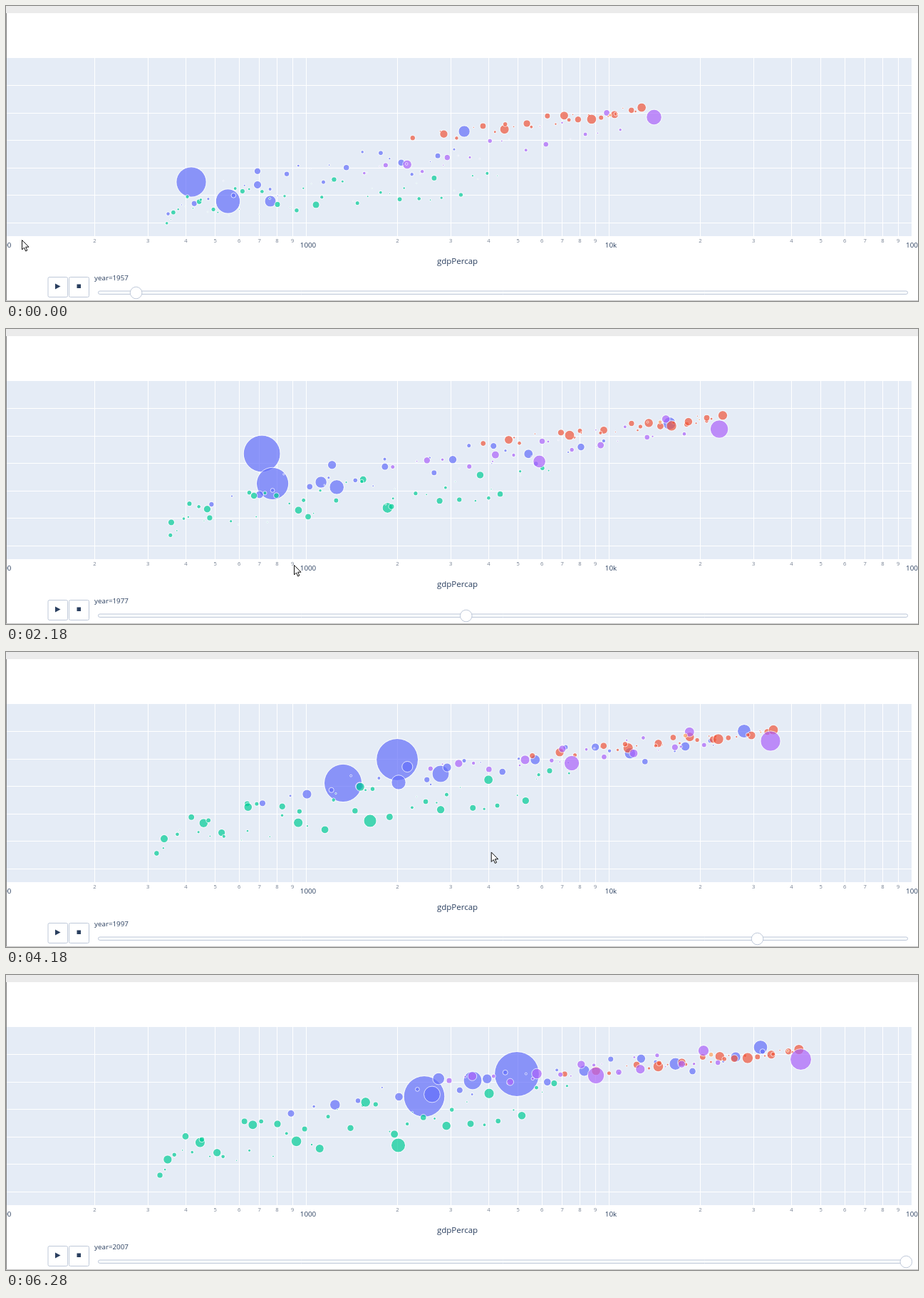
An HTML page with a canvas for the animation above (6590 ms loop, 1280 by 414 pixels).

```html
<!DOCTYPE html>
<html lang="en">
<head>
<meta charset="utf-8">
<title>gdpPercap by year</title>
<style>
  html, body { margin: 0; width: 100%; height: 100%; overflow: hidden; background: #fff; }
  canvas { display: block; width: 1280px; height: 414px; }
</style>
</head>
<body>
<canvas id="stage" width="1280" height="414"></canvas>
<script>
const ctx = document.getElementById('stage').getContext('2d');
const LOOP = 6590, TICK = 135.3;
const INK = '#2a3f5f', BORDER = '#bec8d9';

// Progress in five-year steps, where 0 is 1952 and 11 is 2007, at chosen ticks.
const PACE = { at: [0, 9, 16, 22, 31, 35, 40], step: [0.32, 2.536, 4.53, 6.345, 8.525, 9.565, 11] };
const POINTER = {
  at: [12, 14, 16, 20, 22, 35, 37, 43, 45],
  x: [22, 74, 404, 672, 680, 681, 719, 719, 748],
  y: [328, 332, 331, 290, 286, 278, 282, 282, 224]
};

// Giants pass through four points, reached at these steps.
// Swarms lie around a line [x, y, x, y] that drifts; spread and size run from first to last year.
const STOPS = [0.13, 4.58, 8.57, 11];
const CONTINENTS = [
  {
    color: '#636efa',
    giants: [
      { r: [21, 31.5], path: [[260, 247], [359, 175], [549, 151], [717, 139]] },
      { r: [17, 28.9], path: [[311.5, 274], [374, 217], [473, 184], [587, 170.5]] },
      { r: [8, 13], path: [[371, 274], [464, 222], [610, 171], [655, 148]] },
      { r: [8.2, 9.9], path: [[643, 176], [931, 132.5], [1036, 111], [1059, 101.5]] },
      { r: [5.5, 11.4], path: [[353, 251], [442, 215], [551, 183], [598, 167.5]] }
    ],
    swarm: { count: 26, from: [225, 272, 640, 205], to: [400, 180, 1090, 108], spread: [50, 34], size: [5, 9], skew: 1, rarity: 1.5 }
  },
  {
    color: '#ef553b',
    giants: [],
    swarm: { count: 29, from: [550, 190, 890, 144], to: [765, 142, 1115, 105], spread: [14, 9], size: [7.2, 8], skew: 0.65, rarity: 1.7 }
  },
  {
    color: '#00cc96',
    giants: [{ r: [5, 10.1], path: [[435, 279], [535.5, 251], [511, 237], [550.5, 239]] }],
    swarm: { count: 49, from: [225, 285, 690, 246], to: [215, 252, 790, 165], spread: [42, 60], size: [4.2, 7.6], skew: 1.25, rarity: 1.5 }
  },
  {
    color: '#ab63fa',
    giants: [
      { r: [6.3, 11.8], path: [[563, 222.5], [748.5, 186], [794, 156], [828, 141]] },
      { r: [10.8, 15], path: [[909.5, 156], [1001, 140.5], [1073, 125], [1115.5, 118.5]] }
    ],
    swarm: { count: 22, from: [480, 255, 860, 158], to: [600, 160, 1000, 112], spread: [36, 24], size: [4.6, 8], skew: 0.9, rarity: 1.8 }
  },
  {
    color: '#ffa15a',
    giants: [],
    swarm: { count: 2, from: [846, 154, 854, 152], to: [985, 112, 1105, 106], spread: [0, 0], size: [3.5, 5], skew: 1, rarity: 1 }
  }
];

const mix = (a, b, k) => a + (b - a) * k;
const ease = k => k < 0.5 ? 4 * k ** 3 : 1 - 4 * (1 - k) ** 3;

function sample(stops, values, v) {
  if (v <= stops[0]) return values[0];
  const i = stops.findIndex(s => s > v);
  if (i < 0) return values[values.length - 1];
  return mix(values[i - 1], values[i], (v - stops[i - 1]) / (stops[i] - stops[i - 1]));
}

// Smooth curve through all points (Lagrange).
function curve(path, u) {
  const weights = STOPS.map(a => STOPS.reduce((w, b) => a === b ? w : w * (u - b) / (a - b), 1));
  return [0, 1].map(axis => path.reduce((sum, p, i) => sum + p[axis] * weights[i], 0));
}

let seed = 7;
const random = () => (seed = seed * 16807 % 2147483647) / 2147483647;

const giantBubble = ({ r, path }) => u => [...curve(path, u), mix(...r, (u / 11) ** 0.85)];

function swarmBubbles({ count, from, to, spread, size, skew, rarity }) {
  return Array.from({ length: count }, (_, i) => {
    const place = ((i + random()) / count) ** skew;
    const offset = random() - 0.5, phase = random() * 6.28;
    const weight = 0.16 + 0.84 * ((i + 1) * 0.618 % 1) ** rarity;
    return u => {
      const k = u / 11, sway = Math.sin(Math.PI * k);
      const [x0, y0, x1, y1] = from.map((v, n) => mix(v, to[n], k));
      return [
        mix(x0, x1, place) + sway * (30 * place + 12 * Math.sin(phase + u * 0.5)),
        mix(y0, y1, place) + offset * mix(...spread, k) - sway * 6,
        mix(...size, k) * weight
      ];
    };
  });
}

const traces = CONTINENTS.map(({ color, giants, swarm }) => ({
  color,
  bubbles: [...giants.map(giantBubble), ...swarmBubbles(swarm)]
}));

function rect(x, y, w, h, color) {
  ctx.fillStyle = color;
  ctx.fillRect(x, y, w, h);
}

function text(str, x, y, size, color = INK, align = 'center') {
  ctx.font = `${size}px "Open Sans", sans-serif`;
  ctx.textAlign = align;
  ctx.fillStyle = color;
  ctx.fillText(str, x, y);
}

function outlined(fill, stroke = BORDER) {
  ctx.fillStyle = fill;
  ctx.fill();
  ctx.strokeStyle = stroke;
  ctx.lineWidth = 1;
  ctx.stroke();
}

function box(x, y, w, h, radius, fill) {
  ctx.beginPath();
  ctx.roundRect(x, y, w, h, radius);
  outlined(fill);
}

function disc(x, y, r) {
  ctx.beginPath();
  ctx.arc(x, y, r, 0, 2 * Math.PI);
}

function polygon(points) {
  ctx.beginPath();
  points.forEach(([x, y]) => ctx.lineTo(x, y));
  ctx.closePath();
}

function drawAxes() {
  rect(0, 0, 1280, 414, '#fff');
  rect(0, 0, 1280, 10, '#ebebeb');
  rect(1, 73, 1270, 250, '#e5ecf6');
  for (let i = 0; i < 6; i++) rect(1, Math.round(111 + i * 38.5), 1270, 1, '#fff');
  ['100', '1000', '10k', '100k'].forEach((label, decade) => {
    const base = -3.5 + 425 * decade;
    text(label, base + 2.5, 339, 9.8);
    for (let n = 1; n < 10; n++) {
      const x = base + 425 * Math.log10(n);
      if (x < 1 || x > 1270) continue;
      rect(Math.round(x - 0.5), 73, 1, 250, '#fff');
      if (n > 1) text(n, x, 332, 7.6, '#747f91');
    }
  });
  text('gdpPercap', 633.5, 362, 11.5);
  rect(0, 10, 1, 404, '#858585');
  rect(0, 413, 1280, 1, '#c4c4c4');
}

function drawBubbles(u) {
  ctx.save();
  ctx.beginPath();
  ctx.rect(1, 73, 1270, 250);
  ctx.clip();
  ctx.globalAlpha = 0.7;
  for (const { color, bubbles } of traces) {
    for (const bubble of bubbles) {
      const [x, y, r] = bubble(u);
      disc(x, y, Math.max(0.4, r - 0.5));
      ctx.fillStyle = color;
      ctx.fill();
      disc(x, y, r);
      ctx.strokeStyle = '#fff';
      ctx.lineWidth = 1;
      ctx.stroke();
    }
  }
  ctx.restore();
}

function drawControls(step) {
  box(59, 380.5, 27.5, 28, 2, '#fff');
  box(88.5, 380.5, 28, 28, 2, '#fff');
  polygon([[69, 389.5], [76.5, 393.5], [69, 397.5]]);
  ctx.fillStyle = INK;
  ctx.fill();
  rect(99.5, 390.5, 5.5, 5.5, INK);

  // The handle settles before the bubbles do.
  const done = Math.min(10, Math.floor(step));
  const slide = done + ease(Math.min(1, (step - done) / 0.67));
  text('year=' + (1957 + 5 * done), 124, 385, 9.8, INK, 'left');
  box(129.5, 400, 1136, 4.5, 2.2, '#f8fafc');
  disc(138 + 102.3 * slide, 402.5, 8.3);
  outlined('#fff');
}

function drawPointer(tick) {
  if (tick > 45) return;
  ctx.save();
  ctx.translate(sample(POINTER.at, POINTER.x, tick) + 0.5, sample(POINTER.at, POINTER.y, tick) + 0.5);
  polygon([[0, 0], [0, 13.5], [3, 10.5], [5.2, 15.5], [7.3, 14.5], [5.2, 9.7], [9.5, 9.7]]);
  outlined('#fff', '#111');
  ctx.restore();
}

function render(now) {
  const tick = Math.floor((now % LOOP + 15) / TICK);
  const step = sample(PACE.at, PACE.step, tick);
  const whole = Math.floor(step);
  drawAxes();
  drawBubbles(whole + ease(step - whole));
  drawControls(step);
  drawPointer(tick);
  requestAnimationFrame(() => render(performance.now()));
}
render(0);
</script>
</body>
</html>
```
